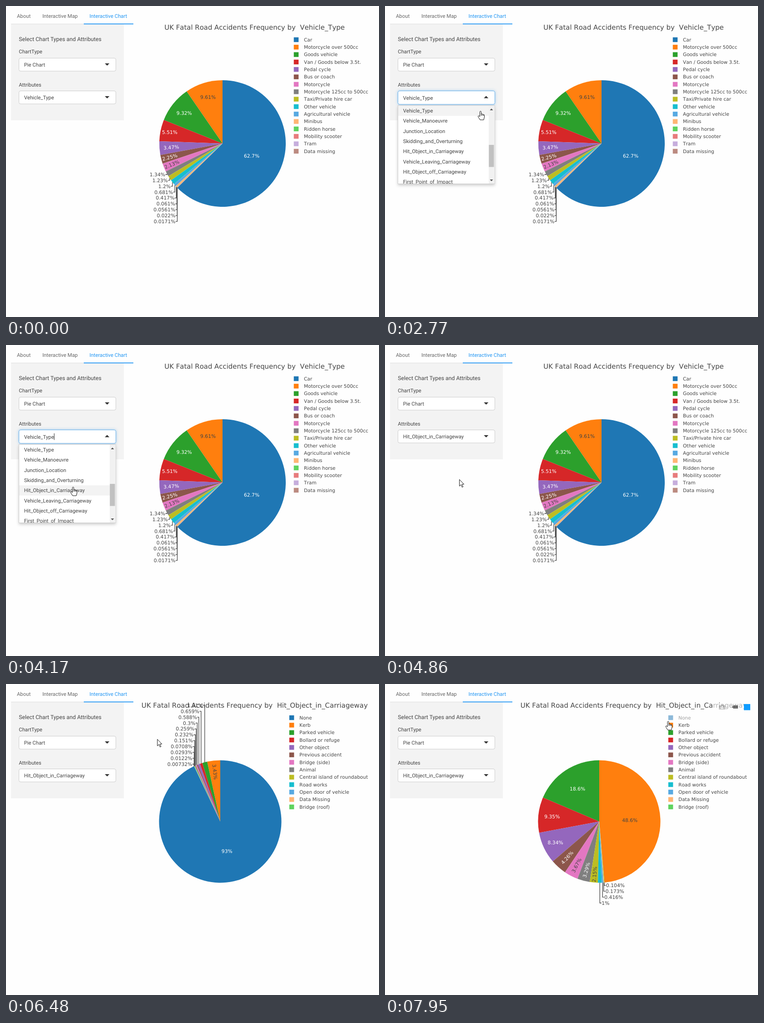
An HTML page that plays this animation: 820 by 683 pixels, repeating every 8 s.

```html
<!DOCTYPE html>
<html lang="en">
<head>
<meta charset="utf-8">
<title>Accident charts</title>
<style>
html, body { margin: 0; height: 100%; overflow: hidden; background: #fefefe; }
svg { display: block; }
text { font: 11.3px Roboto, sans-serif; fill: #444; text-rendering: geometricPrecision; white-space: pre; }
.chart text { font: 10.5px "DejaVu Sans", sans-serif; font-kerning: none; }
.chart .title { font-size: 14.92px; }
.chart .pct { font-size: 10.75px; }
.head { font-size: 12.25px; }
.muted { fill: #666; }
.active { fill: #2196f3; }
</style>
</head>
<body>
<svg id="stage" width="820" height="683" viewBox="0 0 820 683"></svg>
<script>
const LOOP = 8000, OPEN = 2010, PICK = 4630, SWAP = 4930, HIDE = 7870;
const ROW = 22.3, LIST_TOP = 219;
const TAU = 2 * Math.PI;

const base = '1f77b4 ff7f0e 2ca02c d62728 9467bd 8c564b e377c2 7f7f7f bcbd22 17becf'.split(' ');

// Raises the HSL lightness by 20 %, keeping hue and saturation.
function lighten(hex) {
  const rgb = hex.match(/../g).map(h => parseInt(h, 16) / 255);
  const l = (Math.max(...rgb) + Math.min(...rgb)) / 2, room = v => 1 - Math.abs(2 * v - 1);
  return `rgb(${rgb.map(v => Math.round(255 * (l + .2 + (v - l) * room(l + .2) / room(l))))})`;
}
const colors = [...base.map(h => '#' + h), ...base.slice(0, 6).map(lighten)];
const labelColor = i => [1, 6, 8].includes(i) ? '#444' : '#fff';

const text = (x, y, s, attrs = '') => `<text x="${x}" y="${y}" dy=".36em" ${attrs}>${s}</text>`;
const rect = (x, y, w, h, attrs) => `<rect x="${x}" y="${y}" width="${w}" height="${h}" ${attrs}/>`;
const path = (d, attrs = '') => `<path d="${d}" ${attrs}/>`;

// Where a label fits inside a slice: level if possible, else along the radius, else nowhere.
function fit(label, part, r) {
  const h = 13, w = 7 * label.length, half = Math.min(part * Math.PI, Math.PI / 2);
  const inscribed = 1 / (1 + 1 / Math.sin(half));
  if (inscribed * r * 2 >= Math.hypot(w, h)) return { dist: 1 - inscribed };
  const aspect = w / h, q = aspect + 1 / (2 * Math.tan(half));
  const thick = 1 / (Math.sqrt(q * q + .5) + q);
  if (thick * r * 2 >= h) return { dist: Math.cos(thick) - thick * aspect, radial: true };
}

// The first slice runs clockwise from the top, the rest counterclockwise.
function pie({ values, cx, r, labelY, labelStep, side = -1, skip = 0 }) {
  const cy = 302, shown = values.slice(skip), total = shown.reduce((a, b) => a + b);
  const at = (f, d = 1) => [cx - d * r * Math.sin(f * TAU), cy - d * r * Math.cos(f * TAU)];
  let from = -shown[0] / total, slices = '', labels = '';
  shown.forEach((v, i) => {
    const part = v / total, to = from + part, mid = from + part / 2, color = i + skip;
    const pct = +(part * 100).toPrecision(3) + '%', spot = fit(pct, part, r);
    slices += path(`M${cx} ${cy}L${at(from)}A${r} ${r} 0 ${+(part > .5)} 0 ${at(to)}Z`, `fill="${colors[color]}"`);
    if (spot) {
      const [x, y] = at(mid, spot.dist), turn = spot.radial ? 90 - mid * 360 : 0;
      labels += text(x, y, pct, `class="pct" text-anchor="middle" transform="rotate(${turn} ${x} ${y})"
        style="fill:${labelColor(color)}"`);
    } else {
      const [x, y] = at(mid);
      labels += path(`M${x} ${y}V${labelY}h${side * 3.5}`, 'fill="none" stroke="#444" stroke-width="1.3"') +
        text(x + side * 4, labelY, pct, `class="pct" text-anchor="${side < 0 ? 'end' : 'start'}"`);
      labelY += labelStep;
    }
    from = to;
  });
  return slices + labels;
}

function chart(id, c) {
  const legend = c.names.map((name, i) => {
    const y = 74 + i * 16.33;
    return `<g opacity="${i < (c.skip || 0) ? .5 : 1}">` +
      rect(c.legendX, y - 5.2, 10.5, 10.4, `fill="${colors[i]}"`) + text(c.legendX + 22.3, y, name) + '</g>';
  }).join('');
  const title = text(546.5, 46.5, 'UK Fatal Road Accidents Frequency by\u00a0\u00a0' + c.attribute,
    'class="title" text-anchor="middle"');
  return `<g id="${id}" class="chart">${pie(c)}${legend}${title}</g>`;
}

const vehicles = {
  attribute: 'Vehicle_Type', cx: 476, r: 139, legendX: 632.7, labelY: 370, labelStep: 12.9,
  names: ['Car', 'Motorcycle over 500cc', 'Goods vehicle', 'Van / Goods below 3.5t.', 'Pedal cycle', 'Bus or coach',
    'Motorcycle', 'Motorcycle 125cc to 500cc', 'Taxi/Private hire car', 'Other vehicle', 'Agricultural vehicle',
    'Minibus', 'Ridden horse', 'Mobility scooter', 'Tram', 'Data missing'],
  values: [25691, 3938, 3820, 2258, 1422, 922, 873, 549, 504, 492, 279, 171, 25, 23, 9, 7]
};
const objects = {
  attribute: 'Hit_Object_in_Carriageway', cx: 471, r: 134.5, legendX: 622.8, labelY: 47, labelStep: 12.9,
  names: ['None', 'Kerb', 'Parked vehicle', 'Bollard or refuge', 'Other object', 'Previous accident', 'Bridge (side)',
    'Animal', 'Central island of roundabout', 'Road works', 'Open door of vehicle', 'Data Missing', 'Bridge (roof)'],
  values: [38095, 1405, 537, 270, 241, 123, 106, 95, 62, 29, 12, 5, 3]
};
const withoutNone = { ...objects, skip: 1, side: 1, labelY: 481, labelStep: -12.9 };

const options = ['Vehicle_Type', 'Vehicle_Manoeuvre', 'Junction_Location', 'Skidding_and_Overturning',
  'Hit_Object_in_Carriageway', 'Vehicle_Leaving_Carriageway', 'Hit_Object_off_Carriageway', 'First_Point_of_Impact'];
const select = (y, value, id) => rect(28.5, y - 14, 213, 28.5, 'rx="3.5" fill="#fff" stroke="#ccc"') +
  text(39.7, y, value, `id="${id}"`) + path(`M217.3 ${y - 2.5}h10l-5 5z`, 'fill="#333"');

const panel =
  text(24, 22, 'About', 'class="muted"') + text(80, 22, 'Interactive Map', 'class="muted"') +
  text(183.5, 22, 'Interactive Chart', 'class="active"') +
  rect(11, 39, 160, 1, 'fill="#ddd"') + rect(11, 40, 248, 211, 'fill="#f3f3f3"') +
  rect(171, 38.5, 109, 1.8, 'class="active"') +
  text(28.3, 73, 'Select Chart Types and Attributes', 'class="head"') +
  text(28.3, 100, 'ChartType') + select(128.5, 'Pie Chart', 'type') +
  text(28.3, 172.5, 'Attributes') + `<g id="closed">${select(200.5, '', 'choice')}</g>`;

const dropdown = '<g id="open">' +
  rect(28.5, 186.5, 213, 29.5, 'rx="3.5" fill="#fff" stroke="#66afe9" style="filter:drop-shadow(0 0 3px #66afe999)"') +
  text(39.7, 201.5, options[0]) + path('M217.3 202.5h10l-5-5z', 'fill="#333"') +
  rect(105.5, 194, 1, 14.5, 'id="caret" fill="#222"') +
  rect(28.5, 218.5, 212.5, 172, 'fill="#fff" stroke="#d0d0d0" style="filter:drop-shadow(0 3px 3px #0003)"') +
  `<svg x="29" y="${LIST_TOP}" width="199" height="171">` +
  rect(0, 0, 199, ROW, 'id="hover" fill="#f3f3f3"') +
  options.map((s, i) => text(10.7, 11 + i * ROW, s)).join('') + '</svg>' +
  rect(228, 219, 12.5, 171, 'fill="#f1f1f1"') + rect(228.3, 305, 11.2, 48.5, 'fill="#c1c1c1"') +
  path('M230.5 229h7l-3.5-3.7zM230.5 381h7l-3.5 3.7z', 'fill="#505050"') + '</g>';

const toolbar = '<g id="toolbar">' +
  rect(722, 42, 82, 17, 'fill="#fff" opacity=".6"') +
  path('M734 47h3.5l1.5-2h4l1.5 2h3.5v9h-14zM741 48.5a3 3 0 1 0 .01 0z', 'fill="#444" fill-rule="evenodd" opacity=".3"') +
  path('M762.5 50.5l3.5-3.5h10v7h-10z', 'fill="#444" opacity=".75"') +
  rect(789, 44, 14, 13.5, 'fill="#119dff"') + '</g>';

const pen = 'fill="#fff" stroke="#111" stroke-linejoin="round"';
const pointer = '<g id="cursor">' +
  path('M0 0V14.5L3.4 11.4 5.8 17 8 16 5.6 10.5H10Z', pen + ' id="arrow"') + '<g id="hand">' +
  path('M-2 1.5Q-2 0-.5 0T1 1.5V6.5Q1 5.5 2.3 5.7T3.6 7Q4 6.2 5 6.5T6 7.6Q8 7 8 9V13L6.5 19H-1.5' +
    'L-5.5 12.5Q-6.5 10.5-5 10T-2 12Z', pen) +
  path('M1 6.5V10M3.6 7V10M6 7.6V10', 'stroke="#111"') + '</g></g>';

document.getElementById('stage').innerHTML = panel + chart('byVehicle', vehicles) + chart('byObject', objects) +
  chart('noNone', withoutNone) + toolbar + dropdown + pointer;

// Pointer stops: start of the move, its end, and the place reached
const moves = [
  [370, 1150, 224, 203], [1150, 1460, 213, 201], [2320, 2770, 210.5, 231], [2770, 3160, 195, 258],
  [3240, 4170, 148, 312], [4790, 5010, 196.5, 260.5], [5010, 5090, 200, 252], [5870, 6480, 331.5, 121.5],
  [6480, 6720, 645, 102], [6720, 6870, 658, 82], [6940, 7560, 623, 82]
];
function pointerAt(t) {
  let x = 385, y = 684;
  for (const [start, end, toX, toY] of moves) {
    const f = ramp(t, start, end);
    x += (toX - x) * f;
    y += (toY - y) * f;
  }
  return [x, y];
}

const $ = id => document.getElementById(id);
const show = (id, on) => $(id).style.display = on ? '' : 'none';
const ramp = (t, start, end) => Math.min(1, Math.max(0, (t - start) / (end - start)));

function draw() {
  const t = performance.now() % LOOP, [x, y] = pointerAt(t);
  const open = t >= OPEN && t < PICK, hand = t >= 1150 && t < PICK || t >= 6700;
  show('byVehicle', t < SWAP);
  show('byObject', t >= SWAP && t < HIDE);
  show('noNone', t >= HIDE);
  show('open', open);
  show('closed', !open);
  show('caret', t > 2140 && (t - 2140) % 1000 < 500);
  show('cursor', t >= 370);
  show('hand', hand);
  show('arrow', !hand);
  $('choice').textContent = options[t < PICK ? 0 : 4];
  $('hover').setAttribute('y', ROW * Math.max(0, Math.floor((y - LIST_TOP) / ROW)));
  $('toolbar').style.opacity = ramp(t, 600, 800) - ramp(t, 950, 1150) + ramp(t, 6500, 6700);
  $('cursor').setAttribute('transform', `translate(${x} ${y})`);
  requestAnimationFrame(draw);
}
draw();
</script>
</body>
</html>
```
